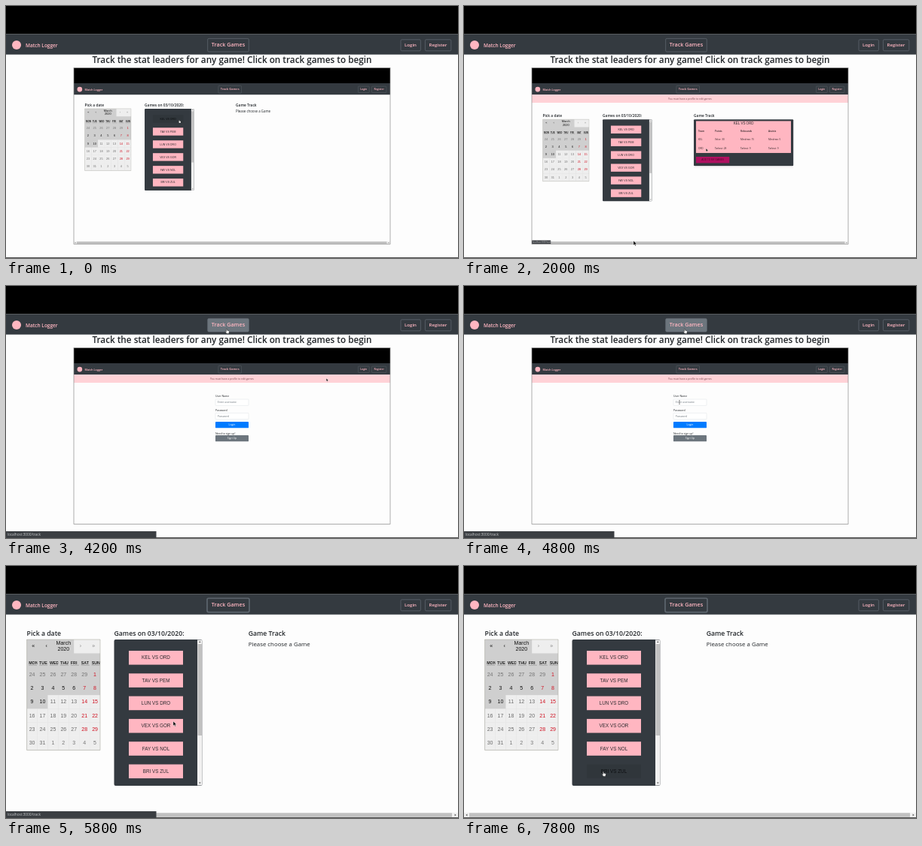
Recreate the animation shown at these times as an HTML page with a canvas. Size 600x336 px, loop 8 s.

```html
<!DOCTYPE html>
<html lang="en">
<head>
<meta charset="utf-8">
<title>Track games</title>
<style>
html, body { margin: 0; width: 100%; height: 100%; overflow: hidden; background: #fdfdfd; }
canvas { display: block; width: 600px; height: 336px; }
</style>
</head>
<body>
<canvas id="stage"></canvas>
<script>
const LOOP = 8000, STEP = 200;
const DARK = '#343a40', PINK = '#ffb6c1', GREY = '#6c757d', PAGE = '#fdfdfd';
const UI = '"Open Sans", "Noto Sans", sans-serif';
const SANS = '"Liberation Sans", Arial, sans-serif';
const BRAND = 'Match Logger';
const GAMES = ['KEL VS ORD', 'TAV VS PEM', 'LUN VS DRO', 'VEX VS GOR', 'FAY VS NOL', 'BRI VS ZUL'];
const STATS = [
  ['Team', 'Points', 'Rebounds', 'Assists'],
  ['KEL', 'Velor: 30', 'Mindrew: 15', 'Mindrew: 5'],
  ['ORD', 'Tarkevi: 28', 'Tarkevi: 9', 'Tarkevi: 9']
];
const URL_TEXT = 'localhost:3000/track';

const canvas = document.getElementById('stage');
const ctx = canvas.getContext('2d');
const ratio = window.devicePixelRatio || 1;
canvas.width = 600 * ratio;
canvas.height = 336 * ratio;

function rect(x, y, w, h, fill) {
  ctx.fillStyle = fill;
  ctx.fillRect(x, y, w, h);
}

function box(x, y, w, h, r, fill, stroke, line = 0.6) {
  ctx.beginPath();
  ctx.roundRect(x, y, w, h, r);
  if (fill) { ctx.fillStyle = fill; ctx.fill(); }
  if (stroke) { ctx.strokeStyle = stroke; ctx.lineWidth = line; ctx.stroke(); }
}

function text(str, x, y, size, color, { font = UI, weight = 400, align = 'left', mid = false } = {}) {
  ctx.font = `${weight} ${size}px ${font}`;
  ctx.textAlign = align;
  ctx.textBaseline = mid ? 'middle' : 'alphabetic';
  ctx.fillStyle = color;
  ctx.fillText(str, x, y);
}

const center = (str, x, y, size, color, opts) =>
  text(str, x, y, size, color, { align: 'center', mid: true, ...opts });

function poly(points, fill, stroke) {
  ctx.beginPath();
  points.forEach(([x, y]) => ctx.lineTo(x, y));
  ctx.closePath();
  ctx.fillStyle = fill;
  ctx.fill();
  if (stroke) { ctx.strokeStyle = stroke; ctx.lineWidth = 0.4; ctx.stroke(); }
}

// Position along timed points [time, x, y], eased within each leg.
function along(path, t) {
  let i = path.findIndex(p => p[0] > t);
  if (i === 0) return path[0].slice(1);
  if (i < 0) return path[path.length - 1].slice(1);
  const [t0, x0, y0] = path[i - 1], [t1, x1, y1] = path[i];
  const k = (t - t0) / (t1 - t0), e = k * k * (3 - 2 * k);
  return [x0 + (x1 - x0) * e, y0 + (y1 - y0) * e];
}

function pointer(kind, [x, y], scale) {
  ctx.save();
  ctx.translate(x, y);
  ctx.scale(scale, scale);
  if (kind === 'arrow') {
    poly([[0, 0], [0, 6], [1.4, 4.8], [2.4, 7], [3.3, 6.6], [2.4, 4.5], [4.2, 4.4]], '#000', '#fff');
  } else if (kind === 'hand') {
    poly([[-0.6, 0], [0.5, 0], [0.6, 2.2], [3, 2.7], [3.4, 3.4], [2.8, 6.4], [0, 6.4], [-1.9, 3.8], [-1.4, 3.3], [-0.6, 4]], '#fff', '#000');
  } else {
    rect(-0.4, -4, 0.8, 8, '#333');
    rect(-1.4, -4, 2.8, 0.6, '#333');
    rect(-1.4, 3.4, 2.8, 0.6, '#333');
  }
  ctx.restore();
}

function nav(width, state) {
  rect(0, 0, width, 37.5, '#000');
  rect(0, 37.5, width, 27.2, DARK);
  ctx.beginPath();
  ctx.arc(14, 52, 6, 0, 7);
  ctx.fillStyle = PINK;
  ctx.fill();
  const label = { weight: 600 };
  text(BRAND, 26, 54.6, 6.5, PINK, label);
  const mid = width / 2 - 5;
  if (state === 'focus') box(mid - 28, 43, 56, 18.6, 2, null, '#5d666e', 1.7);
  else box(mid - 27.3, 43.4, 54.6, 17.6, 1.5, state === 'hover' ? GREY : null, GREY);
  center('Track Games', mid, 51.8, 7.2, PINK, label);
  box(width - 76, 44.8, 26.4, 15, 1.5, null, GREY);
  center('Login', width - 63, 52.7, 6.1, PINK, label);
  box(width - 43.6, 44.8, 34.4, 15, 1.5, null, GREY);
  center('Register', width - 26.5, 52.7, 6.1, PINK, label);
}

function calendar(x, y, width) {
  const col = width / 7, row = 18.25, btn = 17.4;
  const opts = { font: SANS };
  ctx.save();
  ctx.translate(x, y);
  rect(0, 0, width, 147.5, '#cfcfcf');
  rect(width - 2 * btn, 0, 2 * btn, 18.4, '#eee');
  const arrows = [['«', btn / 2], ['‹', btn * 1.5], ['›', width - btn * 1.5], ['»', width - btn / 2]];
  arrows.forEach(([s, ax], i) => center(s, ax, 9, 7, i < 2 ? '#111' : '#888', opts));
  center('March', width / 2, 5.4, 7, '#111', opts);
  center('2020', width / 2, 13, 7, '#111', opts);
  ['MON', 'TUE', 'WED', 'THU', 'FRI', 'SAT', 'SUN'].forEach((d, i) => {
    ctx.save();
    ctx.beginPath();
    ctx.rect(i * col, 24, col, 14);
    ctx.clip();
    text(d, Math.max(i * col + 2.6, i * col + col / 2 - 6), 33, 5.3, '#222', { font: SANS, weight: 700 });
    rect(Math.max(i * col + 2.6, i * col + col / 2 - 6), 33.9, 11, 0.4, '#666');
    ctx.restore();
  });
  for (let i = 0; i < 42; i++) {
    const date = new Date(2020, 1, 24 + i);
    const cx = (i % 7) * col, cy = 37.6 + Math.floor(i / 7) * row;
    const march = date.getMonth() === 2, closed = i > 15;
    if (closed) rect(cx, cy, col + 0.1, row + 0.15, '#eee');
    const color = !march ? '#757575' : i % 7 > 4 ? '#d01020' : closed ? '#6c6c6c' : '#111';
    center(date.getDate(), cx + col / 2, cy + row / 2 + 0.2, 7, color, opts);
  }
  box(0, 0, width, 147.5, 0, null, '#a0a096', 0.5);
  ctx.restore();
}

function gameList(x, y, hover) {
  ctx.save();
  ctx.translate(x, y);
  box(0, 0, 117, 195, 2, DARK);
  rect(110.5, 0.5, 6.5, 194, '#f1f1f1');
  rect(111, 6, 5.5, 122, '#c1c1c1');
  poly([[112.4, 4], [115.2, 4], [113.8, 2.2]], '#555');
  poly([[112.4, 190.5], [115.2, 190.5], [113.8, 192.3]], '#555');
  GAMES.forEach((name, i) => {
    const by = 15 + i * 30.3;
    rect(19.5, by, 72, 18.6, i === hover ? '#30363b' : PINK);
    center(name, 55.5, by + 9.6, 6.3, i === hover ? '#0c0e10' : '#2c2c30', { font: SANS });
  });
  ctx.restore();
}

function statPanel(x, y, active) {
  ctx.save();
  ctx.translate(x, y);
  box(0, 0, 236, 111, 2, DARK);
  rect(0, 114.5, 236, 0.8, '#ecdfe8');
  rect(5.3, 4, 225, 76, PINK);
  center(GAMES[0], 118, 10.6, 8, '#2c2c30', { font: SANS });
  const cols = [10.6, 50, 110.6, 176.7];
  STATS.forEach((cells, r) => {
    const cy = 28 + r * 21;
    cells.forEach((c, i) => text(c, cols[i], cy, 5.6, '#33272a', { mid: true, weight: r ? 400 : 600 }));
  });
  rect(5.3, 89, 79, 15, active ? '#b01060' : PINK);
  center('ADD TO MY GAMES', 44.8, 96.8, 5.6, active ? '#4a0a2c' : '#2c2c30', { font: SANS });
  ctx.restore();
}

function games(cols, calWidth, { hover = -1, panel = false, active = false }) {
  const head = { weight: 600 };
  text('Pick a date', cols[0], 93.2, 8.7, '#212529', head);
  text('Games on 03/10/2020:', cols[1], 93.2, 8.7, '#212529', head);
  text('Game Track', cols[2], 93.2, 8.7, '#212529', head);
  calendar(cols[0], 98, calWidth);
  gameList(cols[1], 98, hover);
  if (panel) statPanel(cols[2], 98, active);
  else text('Please choose a Game', cols[2], 107, 7.85, '#212529');
}

function loginForm() {
  const x = 335.7, w = 78.6;
  const field = (y, hint) => {
    box(x, y, w, 15, 1.5, '#fff', '#ced4da');
    text(hint, x + 5, y + 7.8, 6, GREY, { mid: true });
  };
  const button = (y, label, fill) => {
    box(x, y, w, 14.6, 1.5, fill);
    center(label, x + w / 2, y + 7.4, 6.2, '#fff');
  };
  text('User Name', x, 117.4, 6.2, '#212529');
  field(123.2, 'Enter username');
  text('Password', x, 151, 6.2, '#212529');
  field(156, 'Password');
  button(177, 'Login', '#007bff');
  text('Need to sign up!', x, 206.5, 6.2, '#212529');
  button(209, 'Sign Up', GREY);
}

function scrollbar(width, bottom) {
  const y = bottom - 6.6;
  rect(0, y, width, 6.6, '#f1f1f1');
  rect(7, y + 0.5, width - 15, 5.4, '#c1c1c1');
  poly([[4.4, y + 1.8], [4.4, y + 4.8], [2.4, y + 3.3]], '#555');
  poly([[width - 4.4, y + 1.8], [width - 4.4, y + 4.8], [width - 2.4, y + 3.3]], '#555');
}

function status(width, bottom) {
  rect(0, bottom - 9, width, 9, '#3b3e42');
  text(URL_TEXT, 1.8, bottom - 2.6, 4.7, '#c8cacc');
}

const INNER_PATH = [[400, 230, 152], [1400, 323, 190], [2200, 321, 190], [3400, 467, 115.5], [3600, 474, 112], [4000, 474, 112], [4600, 286, 155]];
const OUTER_PATH = [[1000, 262, 300], [1400, 232, 313], [2000, 225, 313], [2600, 226, 314], [3400, 244, 69], [3800, 293, 57], [5200, 293, 57], [5800, 222, 207], [6200, 223, 214], [6600, 224.5, 237], [7000, 214, 254], [7400, 194, 270], [7800, 185, 274]];

function video(t) {
  const login = t >= 4000, banner = t >= 1800;
  ctx.save();
  ctx.beginPath();
  ctx.rect(90, 82.5, 420, 235);
  ctx.clip();
  ctx.save();
  ctx.translate(90, 82);
  ctx.scale(0.56, 0.56);
  rect(0, 0, 750, 422, PAGE);
  nav(750);
  if (banner) {
    rect(0, 64.7, 750, 19.3, '#ffd2d7');
    center('You must have a profile to edit games', 375, 74.4, 5.9, '#7c4c54');
  }
  if (login) loginForm();
  else {
    ctx.save();
    if (banner) ctx.translate(0, 25.5);
    games([25.9, 167.9, 384], 109.8, {
      hover: t < 600 ? 0 : -1,
      panel: t >= 600,
      active: t >= 1400 && t < 2200
    });
    ctx.restore();
    scrollbar(750, 420.5);
    if (t >= 1400 && t < 2800) status(45, 420.5);
  }
  ctx.restore();
  const onButton = t < 600 || (t >= 1400 && t < 1800) || (t >= 3600 && t < 4200);
  pointer(onButton ? 'hand' : t >= 4600 ? 'beam' : 'arrow', along(INNER_PATH, t), 0.62);
  ctx.restore();
  ctx.strokeStyle = '#8a8a8a';
  ctx.lineWidth = 0.7;
  ctx.strokeRect(90, 82.6, 420, 235);
}

function homePage(t) {
  nav(600, t >= 3800 ? 'hover' : '');
  center('Track the stat leaders for any game! Click on track games to begin', 300, 73, 11.75, '#212529', { weight: 600 });
  video(t);
}

function trackPage(t) {
  nav(600, t < 5400 ? 'hover' : 'focus');
  const hover = t < 6000 ? -1 : t < 6400 ? 3 : t < 6800 ? 4 : t < 7200 ? -1 : 5;
  games([27.6, 143.5, 321.7], 97.4, { hover });
  scrollbar(600, 335.4);
}

function outerKind(t) {
  if (t >= 3800 && t < 5400) return 'hand';
  if (t >= 3400 && t < 3800) return 'beam';
  return t >= 7200 || (t >= 6000 && t < 6800) ? 'hand' : 'arrow';
}

function draw(now) {
  const t = Math.floor((now % LOOP) / STEP) * STEP;
  ctx.setTransform(ratio, 0, 0, ratio, 0, 0);
  rect(0, 0, 600, 336, PAGE);
  if (t < 5000) homePage(t);
  else trackPage(t);
  rect(0, 335, 600, 1, '#555');
  if (t >= 4000 && t < 6200) status(199.5, 336);
  if (t >= 1000) pointer(outerKind(t), along(OUTER_PATH, t), 1);
}

const start = performance.now();
function tick() {
  draw(performance.now() - start);
  requestAnimationFrame(tick);
}
tick();
</script>
</body>
</html>
```
